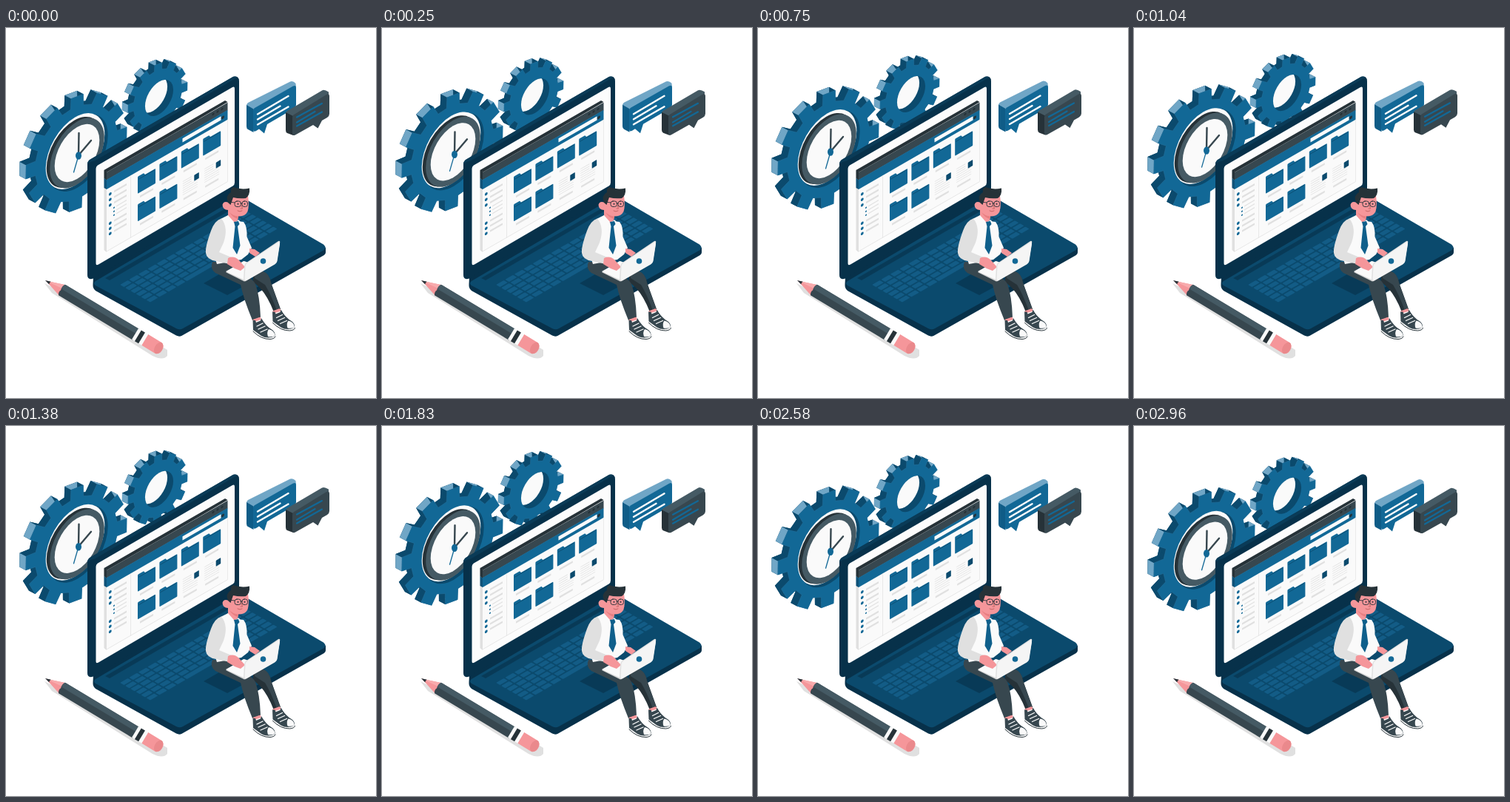
An HTML page for the animation above (3 s loop, 500 px wide and 500 px high).

```html
<!DOCTYPE html>
<html lang="en">
<head>
<meta charset="utf-8">
<title>Isometric workspace</title>
<style>
html, body { margin: 0; width: 100%; height: 100%; overflow: hidden; background: #fff; }
svg { display: block; width: 100vw; height: 100vh; }
.blue { fill: #126896; }
.light { fill: #70a6c6; }
.deep { fill: #0b4a6d; }
.navy { fill: #07314a; }
.slate { fill: #37474f; }
.ink { fill: #263238; }
.white { fill: #fafafa; }
.grey { fill: #e0e0e0; }
.skin { fill: #f5969a; }
.line { fill: none; stroke-linecap: round; stroke-linejoin: round; }
</style>
</head>
<body>
<svg viewBox="0 0 500 500">
  <g id="gears">
    <g id="small"></g>
    <g id="big"></g>
    <g id="clock">
      <g transform="matrix(.866 -.5 0 1 97 168.5)"><circle r="47" class="deep"/></g>
      <g transform="matrix(.866 -.5 0 1 93.5 166.5)"><circle r="46" class="white"/></g>
      <g transform="matrix(.866 -.5 0 1 92 168)"><circle r="43" class="ink"/></g>
      <g transform="matrix(.866 -.5 0 1 96 169)"><circle r="42.5" fill="#455a64"/><circle r="35" class="white"/></g>
      <path class="line" stroke="#37474f" stroke-width="2.4" d="M98 172L98.5 142M98 172L115 152"/>
      <path class="line" stroke="#126896" stroke-width="1.3" d="M99 169L91.5 195"/>
      <ellipse cx="98" cy="172.500" rx="4" ry="5.200" class="blue"/>
    </g>
  </g>

  <g id="bubbles">
    <path class="light" d="M325 105Q325 102 328 100.500L384 72.500Q388 71 391.500 75L392 80L334 112Z"/>
    <path fill="#0f5c87" d="M325 104L334.500 109.500V141L327 137Q325 136 325 133Z"/>
    <path class="blue" d="M334 112Q334 109 337 107.500L388 78.500Q392 76.500 392 81V104Q392 107 389 109L353 130L349 142.500L342 136.500L338 139Q334 141 334 137Z"/>
    <path class="line" stroke="#fff" stroke-width="2.400" d="M340 116.500L381.500 92M340 123.500L370.500 105.500M340 130.500L381.500 106.500"/>
    <path fill="#455a64" d="M378 116Q378 113 381 111.500L427 84.500Q430 82.500 436 86.500L436 92L388 121Z"/>
    <path class="ink" d="M378 114L388 119V145L380 142Q378 141 378 138Z"/>
    <path class="slate" d="M387 121Q387 118 390 116.500L433 90Q437 88 437 92V116Q437 119 434 121L427 125L421.500 135.500L415 131L391 144.500Q387 146.500 387 142Z"/>
    <path class="line" stroke="#126896" stroke-width="2.200" d="M393 120.500L427 102M393 127.500L417.500 113M393 132.500L427 113.500"/>
  </g>

  <g id="laptop">
    <path class="navy" d="M117.500 346L118 337L314 221L326 233L432 297V303Q432 306 428 308L239 415Q235 418 230 415.500L121 355Q117 352 117.500 346Z"/>
    <path class="deep" d="M121 342L311 230Q317 227 324 231.500L429 292.500Q434 297 429 300.500L239 406Q235 408.500 230 406L121 348Q117 345 121 342Z"/>
    <path class="navy" d="M134 338L312 235L317 238L140 341Z" opacity=".6"/>
    <path class="navy" d="M267 345L305 323L338 340L299 361Z" opacity=".6"/>
    <g id="keys" transform="matrix(1 -.577 1 .577 154 347)" fill="#135c86"></g>
    <path class="navy" d="M110 184Q110 180 114 177.500L305 67Q309 64.500 313 66.500Q315 68 315 72V222L118 338.500Q110 341 110 334Z"/>
    <path fill="#0a3b57" d="M110 184Q110 180 114 177.500L305 67Q309 64.500 313 66.500L120 179.500L114 181Z"/>
    <path fill="#fcfcfc" d="M121.500 190Q121.500 187 124 185.500L306 80Q309 78.500 309 82V209Q309 212 306.500 213.500L125 319.500Q121.500 321.500 121.500 318Z"/>
    <path class="grey" d="M132.500 193L136 196V303L132.500 300Z"/>
    <path class="ink" d="M132.500 192L296 98L299.500 100L136 196.500V206L132.500 203Z"/>
    <path fill="#0f5279" d="M132.500 203L136 205.500V218L132.500 216Z"/>
    <g id="page" transform="matrix(1 -.577 0 1 136 195)"></g>
  </g>

  <g id="man">
    <path class="ink" d="M334 329L347 329Q356 332 358 344L371 380L362 384Q354 363 343 351L334 343Z"/>
    <path class="slate" d="M336 328L348 329Q356 332 358 344L371 380L366 382Q358 360 350 347L336 338Z"/>
    <path class="slate" d="M279 316Q275 325 283 331L317 347Q321 366 333 395L344 391Q343 362 337 346Q334 339 321 334L301 326L319 316Z"/>
    <g id="shoe">
      <path class="skin" d="M333.500 394L343.500 390.500L345 394L336 397Z"/>
      <path class="white" d="M333 399L334 410Q343 420 354 421Q363 421 364 416L361 409Z"/>
      <path class="slate" d="M333.500 395L337 395L338 398L344 395.500L345 392Q351 403 360 408Q364 411 363.500 416Q354 421 345 416L334 408Z"/>
      <path class="white" d="M355 407Q363 409 363.500 416Q359 418 354 417Q352 411 355 407Z"/>
      <path class="line" stroke="#fff" stroke-width="1.300" d="M339 403L347 399M341 407L350 403M344 411L353 407"/>
      <path class="line" stroke="#263238" stroke-width="1" d="M334 410Q345 421 357 420.500Q363 420 364 417"/>
    </g>
    <use href="#shoe" x="26.500" y="-11.500"/>
    <path class="white" d="M290 258L300 253L312 261L321 262Q326 268 325.500 282L332 297L327 306L318 313L285 319Q279 302 284 270Z"/>
    <path class="grey" d="M291 257.500Q282 260 277 274Q269 296 270 304Q271 313 284 315L302 319L305 310L288 303L294 290Q301 270 291 257.500Z"/>
    <path class="skin" d="M301 228L327 227Q329 240 326.500 248Q323 255 314 254.500L313 260L308 263L300 256V246Q293 246 292.500 239Q294 233 301 236Z"/>
    <path fill="#e87f82" d="M302 249Q307 254 314 254.500L313.500 258Q306 256 302 249Z"/>
    <path class="ink" d="M300 236Q296 226 304 222Q303 217 307 215Q318 219 329 216.500Q330 226 324 230Q315 231 307 229L303.500 239Z"/>
    <g class="line" stroke="#263238" stroke-width=".9">
      <path d="M302 235L309 236M317 237H319"/>
      <rect x="309" y="234" width="8.500" height="7.500" rx="3"/>
      <rect x="319" y="234" width="7.500" height="7.500" rx="3"/>
    </g>
    <circle cx="313.500" cy="237.800" r="1" class="ink"/>
    <circle cx="322.500" cy="237.800" r="1" class="ink"/>
    <path class="line" stroke="#b85b5a" stroke-width=".8" d="M318 239L319.500 244H317M313 247Q316 249 319 247"/>
    <path class="white" d="M300 253L308 262L304 267L296 258ZM314 259L318 263L315 268L310 263Z"/>
    <path fill="#0f5f8b" d="M308 262L314 261L315.500 265L313 268L316.500 294L312 306L306.500 297L309.500 268Z"/>
    <path class="skin" d="M329 298L336 299L343 304L337 309L329 304Z"/>
    <path fill="#d5d5d5" d="M297 330L322 315L347 324L322 342.500Z"/>
    <path class="white" d="M297 329L321 315L345 323L322 340.500Z"/>
    <path class="skin" d="M300 311Q308 307 315 314L323 323L317 328L309 325L299 319Z"/>
    <path class="grey" d="M322 322Q322 319 325 317L368 288Q371 287 370 291L366 315Q365.500 318 363 319.500L324 342Q321 343 321 340Z"/>
    <path fill="#f5f5f5" d="M323.500 322Q323.500 319 326 317.500L368 289.500Q370.500 288.500 370 292L366.500 315Q366 317.500 363.500 319L326 340.500Q322.500 342.500 322.500 339Z"/>
    <circle cx="347.500" cy="315" r="3.800" class="blue"/>
  </g>

  <g id="pencil">
    <path class="grey" d="M52 345L62 358L198 443Q212 450 218 443V435L140 388Z"/>
    <g transform="translate(75.500 354) rotate(31)">
      <path class="skin" d="M1 -8.500L-25 .5L1 8.500Z"/>
      <path fill="#f8abad" d="M1 -8.500L-25 .5L1 -2Z"/>
      <path class="ink" d="M-18.500 -2Q-20 .5 -18.500 2.500L-26 .5Z"/>
      <path class="slate" d="M0 -8.600H117V8.600H0Q-3 5 -1 1Q-3 -4 0 -8.600Z"/>
      <path fill="#455a64" d="M0 -8.600H117V-1H-1Q-2.500 -5 0 -8.600Z"/>
      <path class="white" d="M115.500 -8.600H132V8.600H115.500Z"/>
      <path class="ink" d="M120 -8.600H126V8.600H120Z"/>
      <path class="skin" d="M131 -8.600H152Q158 -7 158 0T152 8.600H131Z"/>
      <ellipse cx="152.500" rx="5.200" ry="8.400" fill="#ea898c"/>
    </g>
  </g>
</svg>
<script>
const $ = id => document.getElementById(id);
const poly = (pts, cls, extra = '') =>
  `<polygon class="${cls}" points="${pts.map(p => p.map(n => n.toFixed(2)).join()).join(' ')}" ${extra}/>`;
const rect = (x, y, w, h, cls = '', r = 0) =>
  `<rect x="${x}" y="${y}" width="${w}" height="${h}" rx="${r}" class="${cls}"/>`;

// Twelve-tooth gear: sheared front face plus side walls going up and left.
function gear(cx, cy, rx, shear, ry, dx, dy) {
  const at = (deg, r) => {
    const t = deg * Math.PI / 180, u = Math.cos(t) * r, v = Math.sin(t) * r;
    return [cx + rx * u, cy - shear * u + ry * v];
  };
  const front = [];
  for (let a = 1; a < 360; a += 30)
    front.push(at(a - 9, .82), at(a - 7, 1.01), at(a + 7, 1.01), at(a + 9, .82), at(a + 15, .815));
  const back = ([x, y]) => [x + dx, y + dy];
  let walls = '';
  front.forEach((p, i) => {
    const q = front[(i + 1) % front.length];
    const len = Math.hypot(q[0] - p[0], q[1] - p[1]);
    const up = (q[0] - p[0]) / len;
    const lit = i % 5 == 1 && up > -.35;
    walls += poly([p, q, back(q), back(p)], lit ? 'light' : 'deep');
  });
  return poly(front.map(back), 'deep') + walls +
    poly(front, 'blue', 'stroke="#3b83ad" stroke-width=".3" stroke-linejoin="round"');
}

$('big').innerHTML = gear(95, 169, 68, 27, 76, -8.5, -4.5);
$('small').innerHTML = gear(205, 94, 40, 16, 45, -8, -4) +
  `<clipPath id="hole"><circle r="22" transform="matrix(.866 -.5 0 1 207 94.500)"/></clipPath>
   <g clip-path="url(#hole)"><rect x="180" y="60" width="60" height="70" class="deep"/>
   <circle r="22" class="white" transform="matrix(.866 -.5 0 1 199 90)"/></g>`;

let keys = '';
for (let row = 0; row < 6; row++)
  for (let col = 0; col < 14; col++) {
    const bar = row == 5 && col > 3 && col < 9;
    if (bar && col > 4) continue;
    keys += rect(col * 12.4, row * 7.1, bar ? 60 : 10.6, 5.4, '', 1);
  }
$('keys').innerHTML = keys;

// Browser window, drawn on the plane of the screen.
let page = rect(0, 0, 163.5, 107, 'white') + rect(0, 0, 163.5, 10.5, 'slate') +
  rect(0, 10, 163.5, 13, 'blue') + rect(102.5, 13.5, 52, 5.2, 'white') +
  rect(32, 23, .7, 84, 'grey') + rect(0, 106.5, 163.5, .8, 'grey') + rect(163, 23, .6, 84, 'grey');
for (const x of [144, 150, 156]) page += `<circle cx="${x}" cy="4.500" r="1.600" class="ink"/>`;
page += '<circle cx="157" cy="16.500" r="2" class="ink"/>';
[32, 39.5, 47, 71.5, 78.5, 85.5].forEach(y => {
  page += `<circle cx="4.800" cy="${y}" r="1.900" class="blue"/>` + rect(10, y - 1.5, 17, 2.6, 'grey');
});
[53.5, 58.5, 63.5].forEach(y => {
  page += `<circle cx="10" cy="${y}" r="1.100" class="blue"/>` + rect(13, y - .8, 14, 1.2, 'grey');
});
const folder = (x, y) =>
  `<path class="blue" d="M${x} ${y + 1}q0-1 1-1h7l2 3h13q1 0 1 1v18q0 1-1 1h-22q-1 0-1-1z"/>` +
  `<path d="M${x + 1} ${y + 4.2}h22" stroke="#0b4a6d" stroke-width=".7"/>`;
const sheet = (x, y) => {
  let s = rect(x + 17.5, y + 4.5, 6.5, 8, 'deep', .6);
  for (let i = 0; i < 7; i++) s += rect(x + 2, y + 4 + i * 3, i < 3 ? 12 : 20, .9, 'grey');
  return s;
};
for (let i = 0; i < 8; i++) {
  const x = 42 + i % 4 * 29.4, y = 30 + (i > 3) * 37.5;
  page += i < 6 ? folder(x, y) : sheet(x, y);
  page += rect(x + 3, y + 27.5, 18, 2.6, 'grey');
}
$('page').innerHTML = page;

const shift = (id, y) => $(id).setAttribute('transform', `translate(0 ${y})`);
function draw(now) {
  const phase = now % 3000 / 1500;
  const rise = 1 - Math.abs(1 - phase);
  shift('gears', -10 * rise);
  shift('bubbles', -rise);
  requestAnimationFrame(draw);
}
requestAnimationFrame(draw);
</script>
</body>
</html>
```
